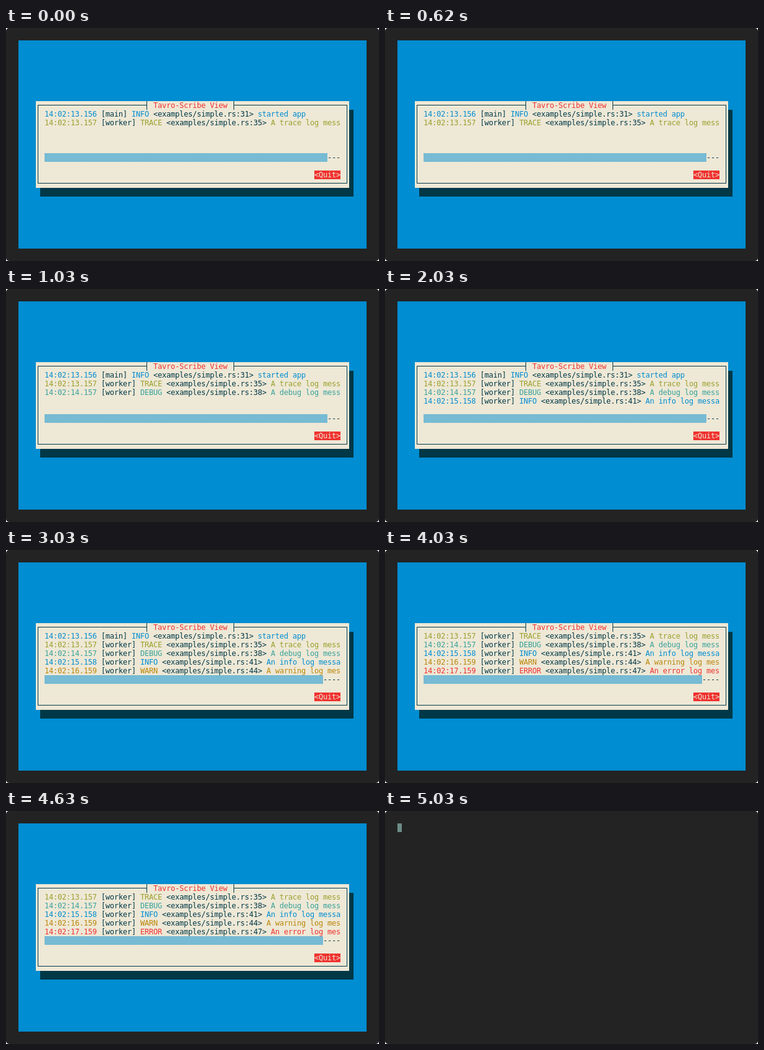
Recreate the animation shown at these times as an HTML page with a canvas. Size 600 px wide and 376 px high, loop 5.57 s.

```html
<!DOCTYPE html>
<html lang="en">
<head>
<meta charset="utf-8">
<title>Terminal log viewer</title>
<style>
html, body { margin: 0; width: 100%; height: 100%; overflow: hidden; background: #fff; }
canvas { display: block; }
</style>
</head>
<body>
<canvas id="stage" width="600" height="376"></canvas>
<script>
const ctx = document.getElementById('stage').getContext('2d');
const LOOP = 5570, VIEW_END = 5030;
const CELL_W = 7, CELL_H = 14, PAD = 20;
const LOG_COL = 6, LOG_ROW = 8, LOG_COLS = 68, LOG_ROWS = 5;

const FRAME = '#232323', BLUE = '#008dd1', CREAM = '#eee8d6', DARK = '#003847';
const RED = '#ef322f', OLIVE = '#9aa02c', TEAL = '#3aa29a', AMBER = '#bb8609', CURSOR = '#6c8d89';

const log = [
  ['14:02:13.156', 'main', 'INFO', 31, 'started app', BLUE],
  ['14:02:13.157', 'worker', 'TRACE', 35, 'A trace log message', OLIVE],
  ['14:02:14.157', 'worker', 'DEBUG', 38, 'A debug log message', TEAL],
  ['14:02:15.158', 'worker', 'INFO', 41, 'An info log message', BLUE],
  ['14:02:16.159', 'worker', 'WARN', 44, 'A warning log message', AMBER],
  ['14:02:17.159', 'worker', 'ERROR', 47, 'An error log message', RED]
].map(([time, thread, level, line, message, color]) => [
  [time, color], [` [${thread}] `, DARK], [level, color],
  [` <examples/simple.rs:${line}> `, DARK], [message, color]
]);

const lineWidth = parts => parts.reduce((sum, [text]) => sum + text.length, 0);
const x = col => PAD + col * CELL_W;
const y = row => PAD + row * CELL_H;

function rect(color, left, top, w, h) {
  ctx.fillStyle = color;
  ctx.fillRect(left, top, w, h);
}

function cells(color, col, row, cols, rows) {
  rect(color, x(col), y(row), cols * CELL_W, rows * CELL_H);
}

// Each character sits on the terminal's cell grid.
function write(text, col, row, color) {
  ctx.fillStyle = color;
  [...text].forEach((ch, i) => ctx.fillText(ch, x(col + i), y(row) + 11));
}

function drawLine(parts, row) {
  let used = 0;
  for (const [text, color] of parts) {
    write(text.slice(0, LOG_COLS - used), LOG_COL + used, row, color);
    used += text.length;
  }
}

function makeShade() {
  const tile = document.createElement('canvas');
  tile.width = tile.height = 2;
  const c = tile.getContext('2d');
  c.fillStyle = BLUE;
  c.fillRect(0, 0, 1, 1);
  c.fillRect(1, 1, 1, 1);
  return ctx.createPattern(tile, 'repeat');
}
const shade = makeShade();

function drawWindow() {
  cells(BLUE, 0, 0, 80, 24);
  cells(DARK, 5, 8, 72, 10);
  cells(CREAM, 4, 7, 72, 10);
  rect(DARK, 51, 124, 176, 1);
  rect(DARK, 366, 124, 183, 1);
  rect(DARK, 51, 250, 498, 1);
  rect(DARK, 51, 124, 1, 127);
  rect(DARK, 548, 124, 1, 127);
  rect(DARK, 226, 118, 1, 14);
  rect(DARK, 366, 118, 1, 14);
  write('Tavro-Scribe View', 31, 7, RED);
  cells(RED, 68, 15, 6, 1);
  write('<Quit>', 68, 15, CREAM);
}

function drawLog(count) {
  const lines = log.slice(0, count);
  lines.slice(-LOG_ROWS).forEach((parts, i) => drawLine(parts, LOG_ROW + i));
  const thumb = Math.floor(LOG_COLS * LOG_COLS / Math.max(...lines.map(lineWidth)));
  cells(shade, LOG_COL, 13, thumb, 1);
  write('-'.repeat(LOG_COLS - thumb), LOG_COL + thumb, 13, DARK);
}

function draw(t) {
  ctx.clearRect(0, 0, 600, 376);
  ctx.font = '12px "DejaVu Sans Mono", monospace';
  ctx.fillStyle = FRAME;
  ctx.beginPath();
  ctx.roundRect(0, 0, 600, 376, 5);
  ctx.fill();
  if (t < VIEW_END) {
    drawWindow();
    drawLog(2 + Math.max(0, Math.floor((t - 30) / 1000)));
  } else {
    cells(CURSOR, 0, 0, 1, 1);
  }
}

function tick() {
  draw(performance.now() % LOOP);
  requestAnimationFrame(tick);
}
tick();
</script>
</body>
</html>
```
